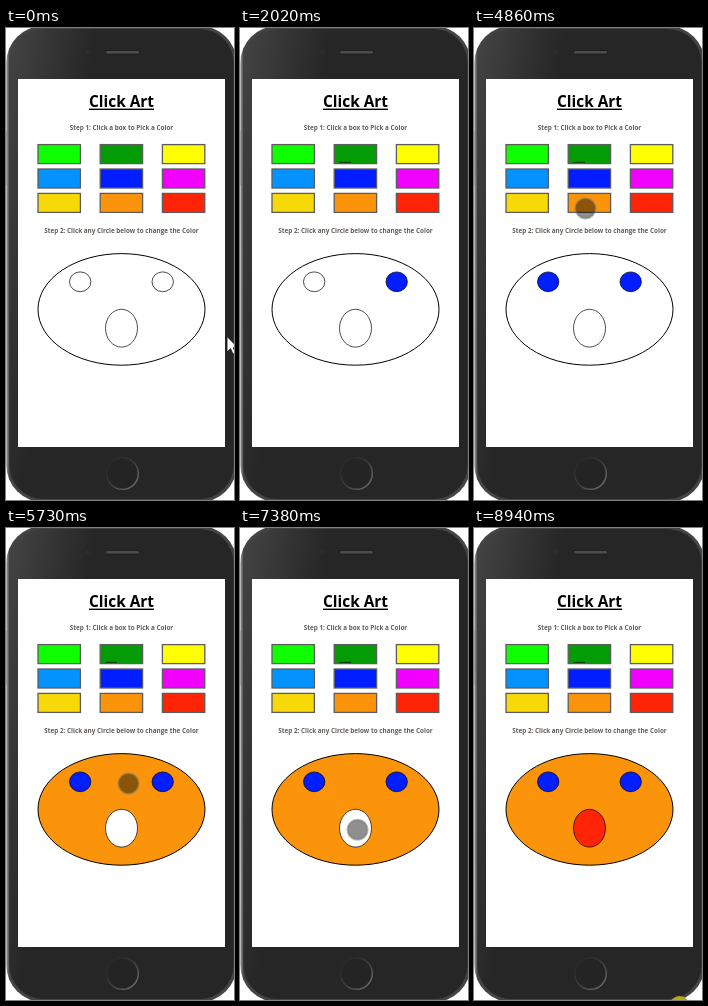
Animation, 228 px wide and 472 px high, one loop 9.1 s. Source, as an HTML page:

```html
<!DOCTYPE html>
<html lang="en">
<head>
<meta charset="utf-8">
<title>Click Art</title>
<style>
  html, body { margin: 0; width: 100%; height: 100%; overflow: hidden; background: #fff; }
  svg { display: block; width: 228px; height: 472px; }
  text { font-family: "Open Sans", "Noto Sans", sans-serif; font-weight: 700; text-anchor: middle; }
  .step { font-size: 6.35px; fill: #625c58; }
  #face ellipse { fill: #fff; stroke: #000; stroke-width: .7; }
  #face #head { stroke-width: 1; }
</style>
</head>
<body>
<svg viewBox="0 0 228 472">
  <defs>
    <linearGradient id="rim">
      <stop offset="0" stop-color="#a0a0a0"/>
      <stop offset=".014" stop-color="#444"/>
      <stop offset=".986" stop-color="#444"/>
      <stop offset="1" stop-color="#a0a0a0"/>
    </linearGradient>
    <linearGradient id="sheen" x2=".35" y2=".12">
      <stop offset="0" stop-color="#fff" stop-opacity=".14"/>
      <stop offset="1" stop-color="#fff" stop-opacity="0"/>
    </linearGradient>
    <linearGradient id="ring" x2="1" y2="1">
      <stop offset="0" stop-color="#222"/>
      <stop offset=".5" stop-color="#3c3c3c"/>
      <stop offset="1" stop-color="#777"/>
    </linearGradient>
  </defs>

  <g id="phone">
    <path d="M.3 103V157" stroke="#999"/>
    <rect x=".3" y="-2" width="230.4" height="476" rx="37" fill="url(#rim)"/>
    <rect x="3.4" y="1" width="224.2" height="470" rx="34" fill="#262626"/>
    <rect x="3.4" y="1" width="224.2" height="470" rx="34" fill="url(#sheen)"/>
    <circle cx="82.5" cy="24" r="1.4" fill="#1a1a1e" stroke="#484848" stroke-width=".6"/>
    <rect x="99.5" y="22.5" width="34" height="3.6" rx="1.8" fill="#4c4c50" stroke="#191919" stroke-width=".8"/>
    <circle cx="116.5" cy="445.5" r="15.8" fill="#242424" stroke="url(#ring)" stroke-width="1.5"/>
    <rect x="12" y="51" width="207" height="368" fill="#fff"/>
  </g>

  <text x="115.5" y="79" font-size="15.4">Click Art</text>
  <rect x="83" y="80.6" width="65" height="1.4"/>
  <text class="step" x="115.5" y="102">Step 1: Click a box to Pick a Color</text>
  <text class="step" x="115.5" y="205">Step 2: Click any Circle below to change the Color</text>

  <g id="boxes" stroke="#5c5c5c" stroke-width="1.3"></g>
  <rect id="dash" x="99.5" y="133.8" width="11.5" height="1.2" fill="#003c00"/>

  <g id="face">
    <ellipse id="head" cx="115.5" cy="281.4" rx="83.5" ry="55.8"/>
    <ellipse id="left" cx="74.2" cy="253.8" rx="10.7" ry="9.9"/>
    <ellipse id="right" cx="156.7" cy="253.8" rx="10.7" ry="9.9"/>
    <ellipse id="mouth" cx="115.5" cy="300.2" rx="16" ry="18.9"/>
  </g>

  <circle id="dot" r="10" fill-opacity=".44" stroke="#6e6e6e" stroke-opacity=".45" stroke-width="2"/>
  <path id="arrow" d="M0 0V15.5L3.6 12.2L6 17.6L8.6 16.5L6.2 11.2H11Z" fill="#fff" stroke="#111" stroke-width=".8"/>
  <circle id="glow" cx="205.5" cy="478" r="10" fill="#b8a914"/>
</svg>
<script>
const LOOP = 9100;
const STEP = 77.5; // the pointer is sampled at this interval
const BLUE = "#001eff", ORANGE = "#fb940b", RED = "#ff2406";
const el = id => document.getElementById(id);

const colors = ["#10ff00", "#049c06", "#ffff00", "#0492ff", BLUE, "#f200ff", "#f7d90a", ORANGE, RED];
colors.forEach((color, i) => {
  const box = document.createElementNS("http://www.w3.org/2000/svg", "rect");
  const attrs = {
    x: 32 + (i % 3) * 62.2, y: 116.6 + Math.floor(i / 3) * 24.4,
    width: 42.4, height: 19, fill: color
  };
  for (const name in attrs) box.setAttribute(name, attrs[name]);
  el("boxes").append(box);
});

const fills = [
  { id: "right", at: 1940, color: BLUE },
  { id: "left", at: 3180, color: BLUE },
  { id: "head", at: 5730, color: ORANGE },
  { id: "mouth", at: 7460, color: RED }
];

// Each touch follows a Bézier curve; a single point is a tap.
const touch = (start, end, ...curve) => ({ start, end, curve });
const touches = [
  touch(70, 760, [203, 258], [125, 16], [95, 64], [109, 154]),
  touch(760, 1000, [109, 153.5]),
  touch(1000, 1240, [107, 151], [112, 158]),
  touch(1940, 2020, [154, 255.5]),
  touch(3180, 3260, [75, 253.5]),
  touch(4860, 4950, [111.5, 180.5]),
  touch(5280, 5500, [117.5, 269.5]),
  touch(5730, 5890, [122.5, 255.5]),
  touch(6900, 7460, [130, 276], [118, 298], [117.5, 302]),
  touch(7460, 8010, [117.5, 302], [117.5, 302], [163, 342], [188, 408])
];

// The pointer turns into an arrow outside the page.
const arrows = [
  { start: 0, end: 70, at: [221, 308.5] },
  { start: 8010, end: 8090, at: [199, 452] }
];

function bezier(points, u) {
  if (points.length === 1) return points[0];
  const mix = (a, b) => a + (b - a) * u;
  const inner = points.slice(1).map((p, i) => [mix(points[i][0], p[0]), mix(points[i][1], p[1])]);
  return bezier(inner, u);
}

function touchAt({ start, end, curve }, t) {
  const snapped = Math.floor((t - start) / STEP) * STEP;
  return bezier(curve, Math.min(1, snapped / (end - start - STEP)));
}

function show(id, on) {
  el(id).style.display = on ? "" : "none";
}

function place(id, point) {
  show(id, point);
  if (point) el(id).setAttribute("transform", `translate(${point})`);
}

function draw(t) {
  const active = item => t >= item.start && t < item.end;
  const press = touches.find(active);

  for (const { id, at, color } of fills) el(id).style.fill = t >= at ? color : "#fff";
  place("dot", press && touchAt(press, t));
  place("arrow", arrows.find(active)?.at);
  show("dash", t >= 690);
  show("glow", t >= 8940);
}

const began = performance.now();
function tick() {
  draw((performance.now() - began) % LOOP);
  requestAnimationFrame(tick);
}
tick();
</script>
</body>
</html>
```
